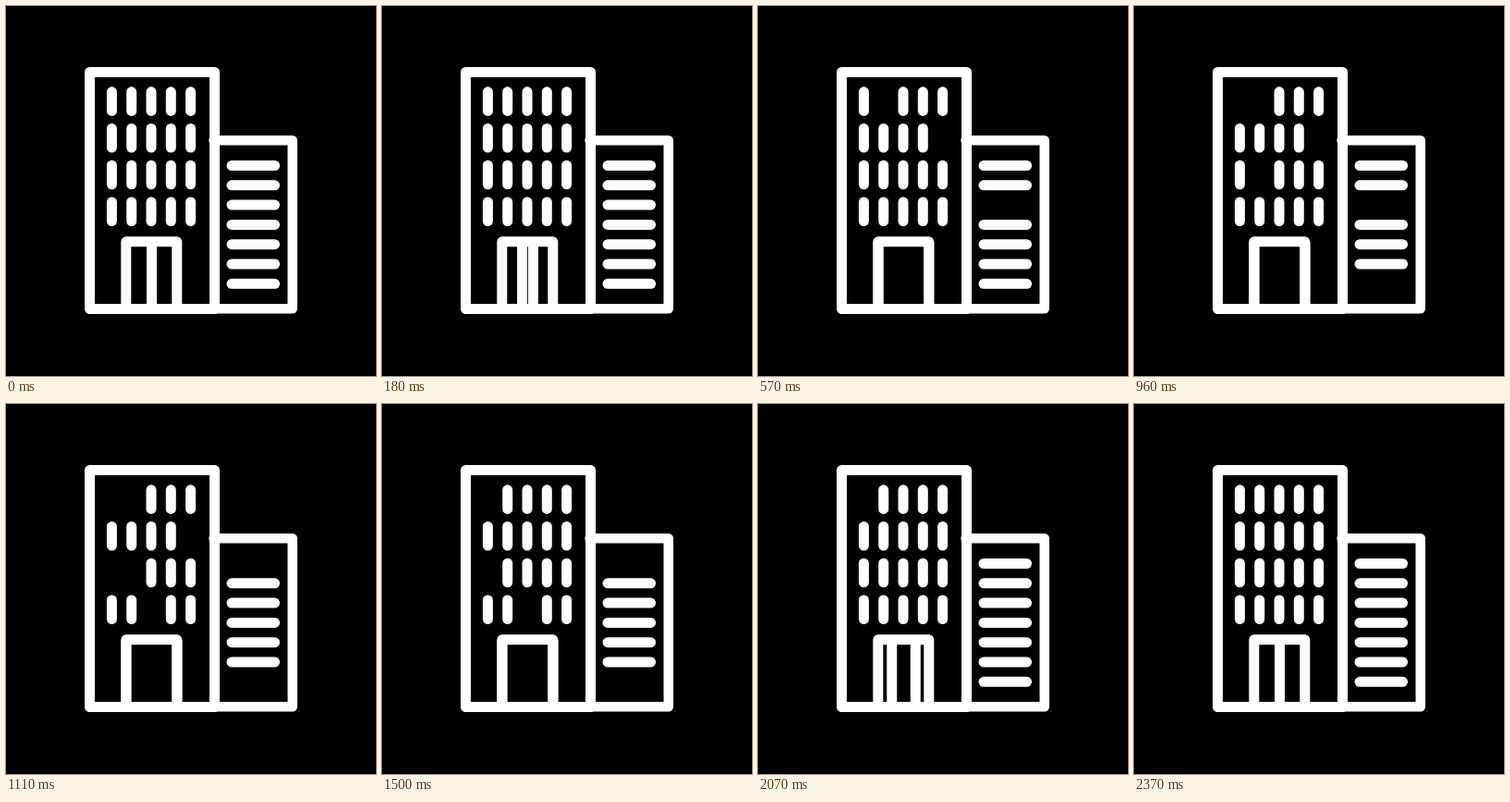
Write an HTML page that moves like this. It is 400x400 px and loops after 2660 ms.

```html
<!DOCTYPE html>
<html lang="en">
<head>
<meta charset="utf-8">
<title>Office building</title>
<style>
  html, body { margin: 0; height: 100%; overflow: hidden; background: #000; }
  svg { display: block; width: 100vw; height: 100vh; }
</style>
</head>
<body>
<svg viewBox="0 0 400 400" fill="none" stroke="#fff" stroke-width="11" stroke-linejoin="round">
  <rect x="90.5" y="71.5" width="135" height="256"/>
  <path d="M224.5 145.3H309.7V327.2H224.5" stroke-width="10.5" stroke-linecap="round"/>
  <path d="M129.8 327V254.8H184.8V327"/>
  <path id="left" d="M157.5 255V327"/>
  <path id="right" d="M157.5 255V327"/>
  <g id="lights" stroke-linecap="round"></g>
</svg>
<script>
const LOOP = 2660, STEP = 30, TRAVEL = 27.5;
const left = document.getElementById('left');
const right = document.getElementById('right');
const lights = document.getElementById('lights');

// Dark intervals in ms: windows keyed by row and column, slats by index.
const dark = {
  w01: [240, 1260], w14: [480, 1500], w21: [660, 1380],
  w00: [960, 2220], w20: [990, 1860], w32: [1080, 1920],
  s2: [360, 1020], s6: [720, 1800], s0: [1110, 1980]
};
const blinking = [];

function addLight(key, d) {
  const path = document.createElementNS('http://www.w3.org/2000/svg', 'path');
  path.setAttribute('d', d);
  lights.append(path);
  if (dark[key]) blinking.push([path, ...dark[key]]);
}

for (let row = 0; row < 4; row++)
  for (let col = 0; col < 5; col++)
    addLight(`w${row}${col}`, `M${114.4 + col * 21.3} ${92.8 + row * 39.7}v20.6`);
for (let i = 0; i < 7; i++)
  addLight(`s${i}`, `M244 ${172.5 + i * 21.3}h46.5`);

function ease(t, start, end) {
  const u = Math.min(1, Math.max(0, (t - start) / (end - start)));
  return u * u * (3 - 2 * u);
}

function draw(now) {
  const t = Math.floor(now % LOOP / STEP) * STEP;
  const offset = TRAVEL * (ease(t, 0, 600) - ease(t, 1740, 2370));
  left.setAttribute('transform', `translate(${-offset})`);
  right.setAttribute('transform', `translate(${offset})`);
  for (const [path, off, on] of blinking)
    path.setAttribute('visibility', t >= off && t < on ? 'hidden' : 'visible');
}

const begin = performance.now();
function tick() {
  draw(performance.now() - begin);
  requestAnimationFrame(tick);
}
tick();
</script>
</body>
</html>
```
